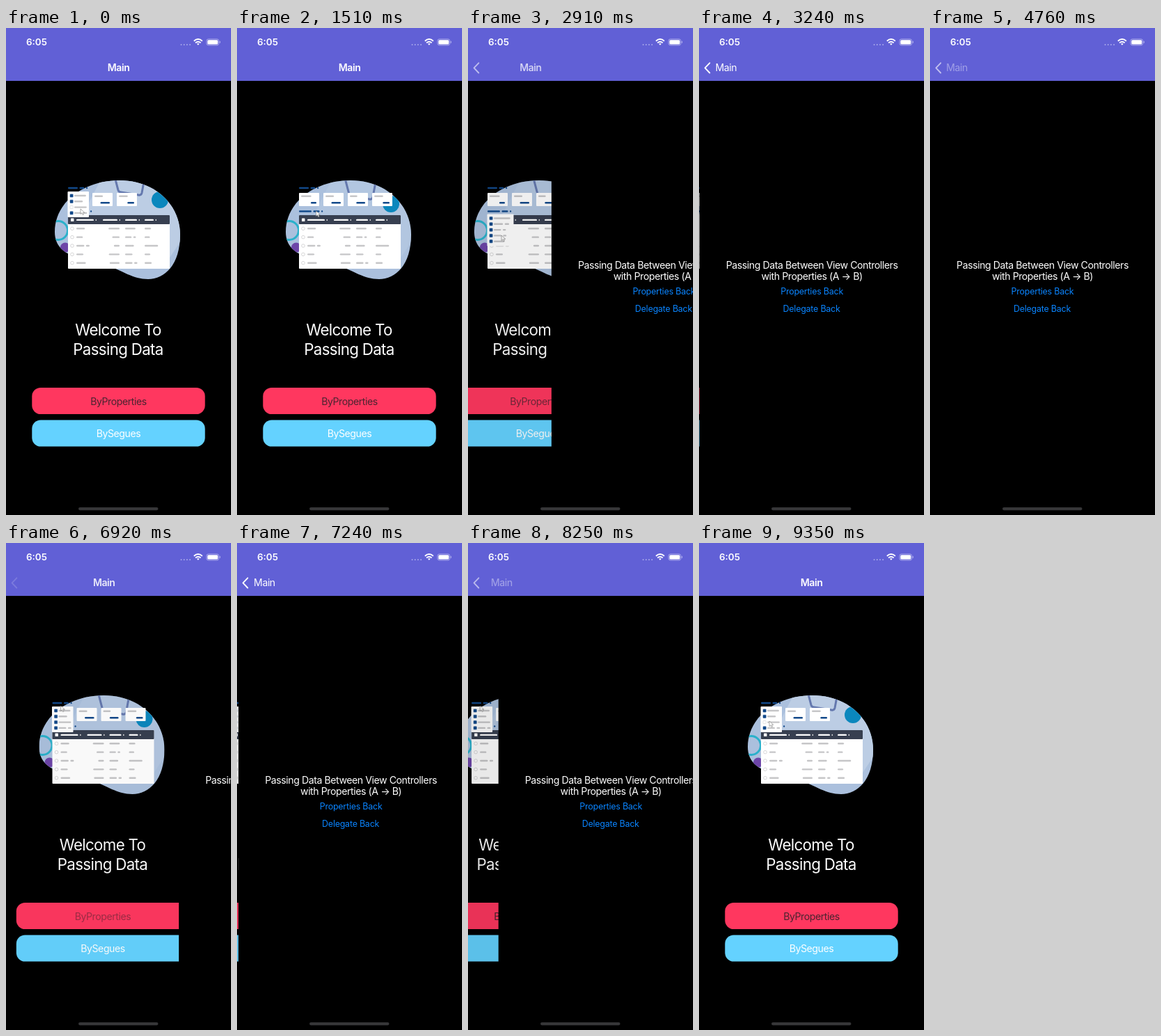
Write an HTML page that moves like this. It is 323x700 px and loops after 9430 ms.

```html
<!DOCTYPE html>
<html lang="en">
<head>
<meta charset="utf-8">
<title>Passing Data</title>
<style>
  html, body { margin: 0; width: 100%; height: 100%; overflow: hidden; background: #000; }
  svg { display: block; width: 100%; height: 100%; }
  text { font: 14.08px Inter, "Liberation Sans", sans-serif; letter-spacing: -.42px; fill: #fff; }
  .mid { text-anchor: middle; }
  .bold { font-weight: 600; }
  .hero { font-size: 22.3px; letter-spacing: -.66px; }
  .link { font-size: 12.42px; letter-spacing: -.2px; fill: #0a84ff; }
</style>
</head>
<body>
<svg viewBox="0 0 323 700">
  <clipPath id="blob"><path d="M163 219C215 219 250 255 250 297C250 340 228 361 204 361C182 361 168 349 142 340C117 331 70 332 70 293C70 250 112 219 163 219Z"/></clipPath>
  <rect width="323" height="700"/>

  <g id="main">
    <g clip-path="url(#blob)">
      <path d="M60 210h200v160H60z" fill="#abc0dd"/>
      <path id="glow" d="M140 210L110 269H235V330L255 300V210Z" fill="#bccde4"/>
      <g id="decor">
        <path d="M155 210L161 233Q162 236 165 236L190 240Q194 241 195 237L200 210" fill="none" stroke="#6478ae" stroke-width="3"/>
        <circle cx="221" cy="247" r="12" fill="#0b87bd"/>
      </g>
      <circle cx="75" cy="291" r="13.5" fill="none" stroke="#2bb1cb" stroke-width="3"/>
      <circle cx="85" cy="315.5" r="7" fill="#6d45a8"/>
    </g>
    <g id="art"></g>
    <g id="menu1"></g>
    <g id="menu2"></g>
    <path id="cursor" d="M0 0V7.5L1.9 5.8L3.2 8.6L4.6 8L3.3 5.3H5.8Z" fill="#fff" stroke="#777" stroke-width=".6"/>
    <text class="mid hero" x="161" y="441.5">Welcome To</text>
    <text class="mid hero" x="161" y="469.8">Passing Data</text>
    <rect x="37.3" y="516.9" width="248.4" height="38.2" rx="12.5" fill="#ff375f"/>
    <rect x="37.3" y="563.4" width="248.4" height="38.2" rx="12.5" fill="#64d2ff"/>
    <text id="press" class="mid" x="161.5" y="541.5" style="fill:#4a2430">ByProperties</text>
    <text class="mid" x="161.5" y="588">BySegues</text>
    <rect id="shade" x="-5" y="75" width="420" height="625"/>
  </g>

  <g id="detail">
    <rect y="75" width="330" height="625"/>
    <text class="mid" x="161.5" y="346">Passing Data Between View Controllers</text>
    <text class="mid" x="161.5" y="362.3">with Properties (A → B)</text>
    <text class="mid link" x="161.5" y="383">Properties Back</text>
    <text class="mid link" x="161" y="408">Delegate Back</text>
  </g>

  <rect width="323" height="76" fill="#6160d6"/>
  <text class="bold" x="29" y="25" style="font-size:13.4px;letter-spacing:0">6:05</text>
  <path d="M251.5 24h14" stroke="#a9a8ea" stroke-width="2" stroke-linecap="round" stroke-dasharray="0 4.2"/>
  <g fill="none" stroke="#fff" stroke-width="1.9">
    <path d="M269.8 18.7Q275.8 13.2 281.8 18.7M272 21.4Q275.8 18 279.6 21.4"/>
    <path d="M274 22.8L275.8 24.8L277.6 22.8Q275.8 21.4 274 22.8Z" fill="#fff" stroke="none"/>
    <rect x="287.9" y="15.9" width="17.6" height="8.9" rx="2.6" stroke="#b3b2ee" stroke-width=".9"/>
    <rect x="289.2" y="17.2" width="15" height="6.3" rx="1.5" fill="#fff" stroke="none"/>
    <path d="M307.2 18.8v3" stroke="#b3b2ee" stroke-width="1.1"/>
    <path id="chevron" d="M15.3 50.3L8.6 57.4L15.3 64.5" stroke-linecap="round" stroke-linejoin="round"/>
  </g>
  <text id="title" class="mid bold" y="62.3">Main</text>
  <text id="back" class="mid" y="62.3">Main</text>
  <rect x="104" y="689" width="114.5" height="4.2" rx="2.1" fill="#363638"/>
</svg>

<script>
const LOOP = 9430, NAVY = '#12498a', GRAY = '#c6c6c8';
const $ = id => document.getElementById(id);

// ---- illustration parts ----
let seed = 5;
const random = (lo, hi) => {
  seed = seed * 16807 % 2147483647;
  return lo + (hi - lo) * seed / 2147483647;
};
const repeat = (n, draw) => Array.from({ length: n }, (_, i) => draw(i)).join('');
const box = (x, y, w, h, fill, r = 1) =>
  `<rect x="${x}" y="${y}" width="${w}" height="${h}" rx="${r}" fill="${fill}"/>`;
const bar = (x, y, w, fill = GRAY) => box(x, y - 1.2, w, 2.4, fill, 1.2);
// a stand-in for one or two words
const words = (x, y, w) => w > 15 && random(0, 1) < .4
  ? bar(x, y, w * .6) + bar(x + w * .6 + 2.5, y, w * .4 - 2.5)
  : bar(x, y, w);

const filter = (y, w) => bar(89, y, w, NAVY) + bar(91.5 + w, y, w / 2, NAVY) + bar(94 + w * 1.5, y, 2.2, NAVY);

const card = () => {
  const w = random(8, 15);
  return `<g class="card">${box(0, 237, 29, 19, '#fff')}${words(3, 241.7, random(10, 17))}${bar(25 - w, 251.2, w, NAVY)}</g>`;
};

const columns = [101, 139, 171, 199];
const header = columns.map((x, i) => bar(x, 275.9, 25 - 4 * i, '#fff') + bar(x + 27.5 - 4 * i, 275.9, 1.6, '#ddd')).join('');
const row = i => {
  const y = 288.3 + i * 12.35;
  return `<circle cx="95" cy="${y}" r="2.3" fill="none" stroke="${GRAY}" stroke-width=".7"/>` +
    columns.map((x, c) => {
      const w = random(7, 20);
      return words(c === 1 ? 163 - w : x, y, w);   // second column is set flush right
    }).join('');
};

$('art').innerHTML =
  filter(230, 14) + filter(263.5, 18) + repeat(4, card) +
  box(89, 269, 146, 77, '#fff') + box(89, 269, 146, 13, '#373f50') +
  box(93, 273.6, 4.4, 4.4, '#fff', .6) + header + repeat(5, row);

// a menu is drawn from its own top edge so that it can unfold
const menu = (w, h, n) => box(88.5, 0, w, h, '#fff') + repeat(n, i => {
  const y = 6 + i * 8.3;
  return `<rect class="tick" x="92" y="${y - 2.1}" width="4.2" height="4.2" rx=".5" fill="${NAVY}" stroke="${NAVY}" stroke-width=".5"/>` +
    words(98, y, random(.35, .65) * w);
});
$('menu1').innerHTML = menu(30.5, 37, 4);
$('menu2').innerHTML = menu(38, 46, 5);

const cards = document.querySelectorAll('.card');
const tick = document.querySelectorAll('#menu1 .tick')[2];

// ---- motion ----
const ease = (t, from, to) => {
  const u = Math.min(1, Math.max(0, (t - from) / (to - from)));
  return u * u * (3 - 2 * u);
};
const spring = ms => {
  const x = Math.max(0, ms) * .0194;
  return 1 - (1 + x) * Math.exp(-x);
};
const place = (el, x, y = 0, sy = 1) => el.setAttribute('transform', `translate(${x} ${y}) scale(1 ${sy})`);
const fade = (id, a) => $(id).setAttribute('opacity', a);

const visits = [{ from: 2801, to: 4984 }, { from: 6874, to: 8218 }];
const pushed = t => visits.reduce((p, v) => p + spring(t - v.from) - spring(t - v.to), 0);

// cursor moves: start, end, where it arrives
const hops = [
  [50, 360, 115, 265], [970, 1510, 113.5, 263], [2300, 2600, 109, 298],
  [5600, 6430, 101, 234], [8600, 9080, 101, 256], [9350, LOOP, 107, 260]
];

function drawArt(t) {
  let x = 107, y = 260;
  for (const [from, to, toX, toY] of hops) {
    const k = ease(t, from, to);
    x += (toX - x) * k;
    y += (toY - y) * k;
  }
  place($('cursor'), x, y);
  place($('menu1'), 0, 235, 1 - ease(t, 970, 1120) + ease(t, 6690, 6780));
  place($('menu2'), 0, 267.5, ease(t, 1870, 2110) - ease(t, 5590, 5800));

  // the third card leaves and the fourth takes its place
  const third = ease(t, 1150, 1500) - ease(t, 9070, 9180);
  cards.forEach((el, i) => place(el, 89 + 35 * (i < 3 ? i : 2 + third)));
  cards[2].setAttribute('opacity', third);
  place($('decor'), 0, 6 * third);
  fade('glow', 1 - .6 * third);
  const ticked = t > 1150 && t < 9080;
  tick.setAttribute('fill', ticked ? NAVY : '#fff');
  tick.setAttribute('stroke', ticked ? NAVY : GRAY);
}

function drawNav(t) {
  const p = pushed(t), q = pushed(t - 9);
  const pressed = visits.some(v => t > v.from - 180 && t < v.to);
  const backHeld = visits.some(v => t > v.to - 250 && t < v.to + 400);
  const x = 161.5 - 123 * q;
  place($('main'), -97 * p);
  place($('detail'), 323 * (1 - p));
  fade('shade', .1 * p);
  fade('press', pressed ? .4 + .6 * p : 1);
  $('title').setAttribute('x', x);
  $('back').setAttribute('x', x);
  fade('title', 1 - q);
  fade('back', q * (backHeld ? .4 : 1));
  fade('chevron', q * (backHeld ? .6 : 1));
}

const start = performance.now();
function frame() {
  const t = (performance.now() - start) % LOOP;
  drawArt(t);
  drawNav(t);
  requestAnimationFrame(frame);
}
frame();
</script>
</body>
</html>
```
